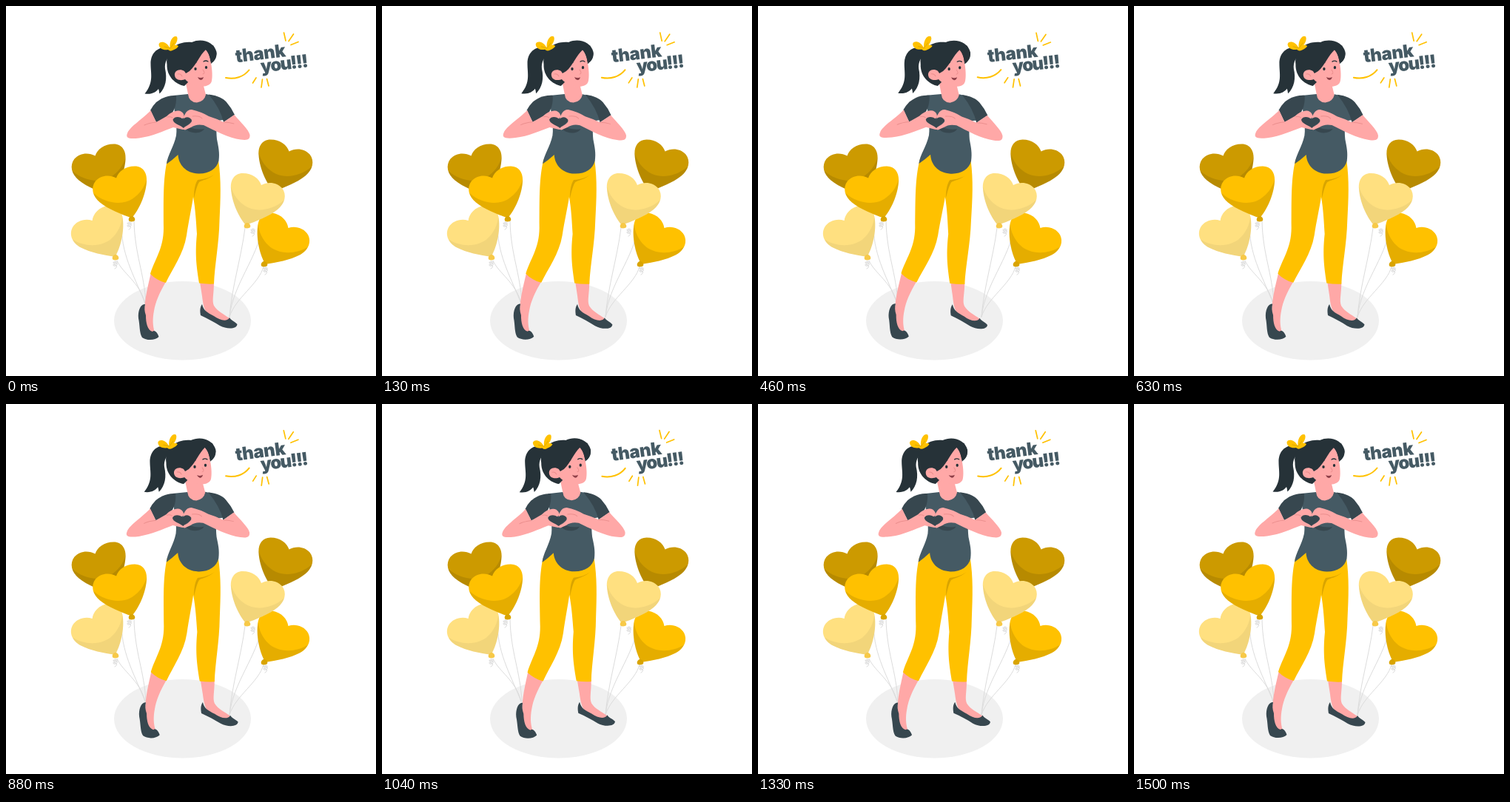
These frames come from a looping animation (500 by 500 pixels, 1.54 s). An HTML page:

```html
<!DOCTYPE html>
<html lang="en">
<head>
<meta charset="utf-8">
<title>Thank you</title>
<style>
  html, body { margin: 0; height: 100%; overflow: hidden; background: #fff; }
  svg { display: block; width: 100%; height: 100%; }
  text { font: 900 24px Inter, sans-serif; letter-spacing: -.4px; fill: #455a64; }
  .line { fill: none; stroke-linecap: round; stroke-linejoin: round; }
  .skin { fill: #ffa8a7; }
  .dark { fill: #37474f; }
  .hair { fill: #263238; }
  .shade { fill: #000; opacity: var(--shade, .1); }
  .gold { fill: #cc9a00; }
  .yellow { fill: #ffc100; }
  .pale { fill: #ffe080; --shade: .05; }
</style>
</head>
<body>
<svg viewBox="0 0 500 500">
  <defs>
    <!-- Balloon with its tip at 0,0 -->
    <g id="balloon">
      <path d="M0 0C-14-5-32-12-43-21C-53-29-56-41-49-50C-42-58-30-59-21-54C-18-63-9-70 4-70C16-70 21-60 20-49C19-31 9-10 0 0Z"/>
      <path class="shade" d="M0 0C-14-5-32-12-43-21C-48-25-51-30-52-34C-36-19-12-17 1-26C10-32 17-41 20-52C20-31 9-10 0 0Z"/>
    </g>
    <path id="knot" d="M-1-2C-5 0-5 4-3 5C0 6 3 5 4 4C5 1 3-1 1-2Z"/>
    <path id="curl" class="line" stroke="#d2d2d2" stroke-width=".9" d="M0 0C5 0 4 4 0 3C-4 2-2 0 2 2C5 4 2 7-1 6C-4 5-1 3 1 5C4 7 2 9 0 10"/>
  </defs>

  <ellipse cx="238.5" cy="425.3" rx="92.5" ry="53.3" fill="#f0f0f0"/>

  <g class="line" stroke="#dcdcdc">
    <path d="M150 344C157 361 181 373 188 402M156 300C157 340 176 370 188 402M173 291C174 336 187 361 189 402"/>
    <path d="M323 300C318 340 305 380 302 420M346 300C340 340 306 378 302 420M348 352C342 376 310 394 302 420"/>
  </g>

  <use href="#balloon" class="gold" transform="translate(141.5 256.5)"/>
  <use href="#balloon" class="pale" transform="translate(147.5 339) rotate(-11)"/>
  <use href="#balloon" class="yellow" transform="translate(170 286.5)"/>
  <use href="#balloon" class="gold" transform="translate(361.5 250.5) scale(-1 1)"/>
  <use href="#balloon" class="yellow" transform="translate(350.5 349) scale(-1 1) rotate(-11)"/>
  <use href="#balloon" class="pale" transform="translate(324 296) scale(-1 1)"/>
  <use href="#knot" fill="#d9a400" x="170" y="286"/>
  <use href="#knot" fill="#f7c948" x="148" y="338"/>
  <use href="#knot" fill="#f7c948" x="326" y="295"/>
  <use href="#knot" fill="#d9a400" x="349" y="347"/>
  <use href="#curl" x="166" y="292"/>
  <use href="#curl" x="147" y="345"/>
  <use href="#curl" x="333" y="301"/>
  <use href="#curl" x="350" y="353"/>

  <g id="girl">
    <!-- Feet and trousers -->
    <path class="skin" d="M196 360L217 371C207 388 202 400 200 412C198 422 198 432 201 441C191 441 187 430 187 416C187 396 192 378 196 360Z"/>
    <path class="dark" d="M188 403C182 402 178 412 179 422C181 431 180 442 184 448C190 452.500 202 452 206.500 447C205 442 201 437 198 440C191 438 189 428 189 418C187 412 187 408 188 403Z"/>
    <path class="skin" d="M262 373H281C281 390 278 398 281 405C286 413 294 416 302 422C300 429 285 427 275 419C267 412 266 400 265 392Z"/>
    <path class="dark" d="M265 403C262 407 262 412 263 418C272 422 281 427 289 432C298 437 312 437 312.500 430C309 426 304 425 302 421C299 427 289 425 281 419C272 414 267 412 265 403Z"/>
    <path class="yellow" d="M218 208C212 235 213 260 213 300C213 328 201 342 195 362C201 368 208 372 216 374C225 355 240 335 244 310C247 290 251 272 253 258C256 274 257 293 258 308C255 338 258 355 261 374.500Q271 376 281 375.500C282 350 288 320 288.500 290C290 260 291 235 287 208L233 198Z"/>
    <path fill="#d9a400" d="M282 227C273 235 265 235 261 238C258 243 256 251 254 260C254 250 255 241 259 235C268 234 276 232 282 227Z"/>

    <!-- Ponytail and bow -->
    <path class="hair" d="M223 57C207 53 195.500 62 195.500 78C195.500 92 200 103 187.500 118.500C197 120 203 116 206 112C207 114 207 117 207.500 118.500C216 110 218 98 215 85C214 76 218 69 225 63Z"/>

    <!-- Shirt -->
    <path fill="#455a64" d="M226 121L246 119Q258 130 270 119L284 122L299 153L287 155C284 160 284 168 285 180C287 190 289 198 287.500 209C285 220 274 227 260 226.500C243 226 233 214 232.500 201Q225 208 217 213.500C218 202 227 190 230 175C232 160 227 154 228 146Z"/>
    <path class="dark" d="M230 121C217 120 208 126 203 130Q198 135 195 141L203 157L218 151Q231 142 230 121Z"/>
    <path class="dark" d="M274 119.500C286 121 294 125 298 130Q305 138 309 147L294 157Q290 139 274 119.500Z"/>
    <path class="dark" d="M246 163Q257 168 268 166C264 173 250 173 244 167Z"/>
    <path class="skin" d="M241 95L246 119Q247 130 258 130.500Q268 129 270 120L266 104Z"/>

    <!-- Arms and hands -->
    <path class="skin" d="M195.500 141C187 151 167 163 164 172C161 179 167 180 180 178.500C198 176 212 169 226 164L239 167Q243 166 240 163Q231 161 227 156Q231 151 238 152Q242 151 240 146Q237 141 232 141.500Q224 142 217 149L203 157Z"/>
    <path class="skin" d="M308.500 147C316 156 328 167 329.500 174C330 180 327 182 317 180.500C302 179 281 168 267 161Q257 159 250 164L242 167.500Q238 167 240 164Q248 161 251 156Q249 150 242 153Q238 152 242 146Q245 140 251 140Q264 143 274 149Q284 152 294 157Z"/>
    <path class="dark" d="M239.500 153.500C235 149 228 149 225.500 153.500C226 159 234 160 240 165C244 160 250 159 251 154C248 149 242 149 239.500 153.500Z"/>
    <path class="line" stroke="#eb8f8e" d="M203 157Q193 158 187 161M294 157Q301 157 308 159M218 150Q222 149 225 151M252 149Q262 148 265 152"/>

    <!-- Head -->
    <path class="hair" d="M217.500 79C215 58 233 47 251 49C264 43 281 48 284.500 62C285 69 283 73 279 76L262 70L250 99L241 108C230 106 217 96 217.500 79Z"/>
    <path class="skin" d="M248 88C257 80 262 66 270 59C274 63 276 70 277 77C279 88 279 96 278 101C277 107 270 109 264 108.500C254 108 246 104 242 99C238 101 229 101 228 94C227 87 235 84 241 88L243 91Z"/>
    <path class="hair" d="M269 58C274 63 276 69 277 78Q284 73 284.500 64L280 53Z"/>
    <path class="line" stroke="#eb8f8e" d="M232 92Q236 91 238 95M266 86Q270 91 266 92"/>
    <g class="hair">
      <ellipse cx="256" cy="85" rx="1.700" ry="2.100"/>
      <ellipse cx="270.500" cy="83" rx="1.700" ry="2.100"/>
    </g>
    <path class="line" stroke="#263238" stroke-width="1.300" d="M251 79Q253 76 257 76M267 75Q270 73 273 75"/>
    <path fill="#8e3f48" d="M259 96Q263 98 267 96Q266 100 263 100Q260 99 259 96Z"/>
    <path class="yellow" d="M221.500 57C217 47 207 47 206.500 52C207 58 213 60 219 59Q222 62 226 59.500Q232 57 233 54Q230 52 228 53Q233 46 231 41.500C227 39 220.500 45 221.500 57Z"/>
    <path class="line" stroke="#d9a400" stroke-width=".8" d="M214 55L222 57L227 50"/>
  </g>

  <g id="greeting">
    <text transform="translate(311 76.5) rotate(-7)">thank</text>
    <text transform="translate(345 90) rotate(-7)" style="letter-spacing:-1.6px">you!!!</text>
    <g class="line" stroke="#ffc100" stroke-width="1.700">
      <path d="M375.500 36L378 47M388.500 38L382 47.500M395 48.500L385 52.500M338 97L333.500 104M346.500 99L345 110M352.500 98.500L355 108"/>
      <path stroke-width="2" d="M297 97C309 99.500 321 96 328.500 86.500"/>
    </g>
  </g>
</svg>
<script>
  const LOOP = 1540, SWING = 1500;
  const parts = [['girl', '246 247'], ['greeting', '352 73.5']]
    .map(([id, pivot]) => [document.getElementById(id), pivot]);

  // Linear sway in degrees: 0, 1 at a quarter, -1 at three quarters, 0
  function sway(ms) {
    const phase = ms % LOOP % SWING / SWING;
    return phase < .25 ? phase * 4 : phase < .75 ? 2 - phase * 4 : phase * 4 - 4;
  }

  function draw() {
    const angle = sway(performance.now());
    for (const [part, pivot] of parts)
      part.setAttribute('transform', `rotate(${angle} ${pivot})`);
    requestAnimationFrame(draw);
  }
  draw();
</script>
</body>
</html>
```
